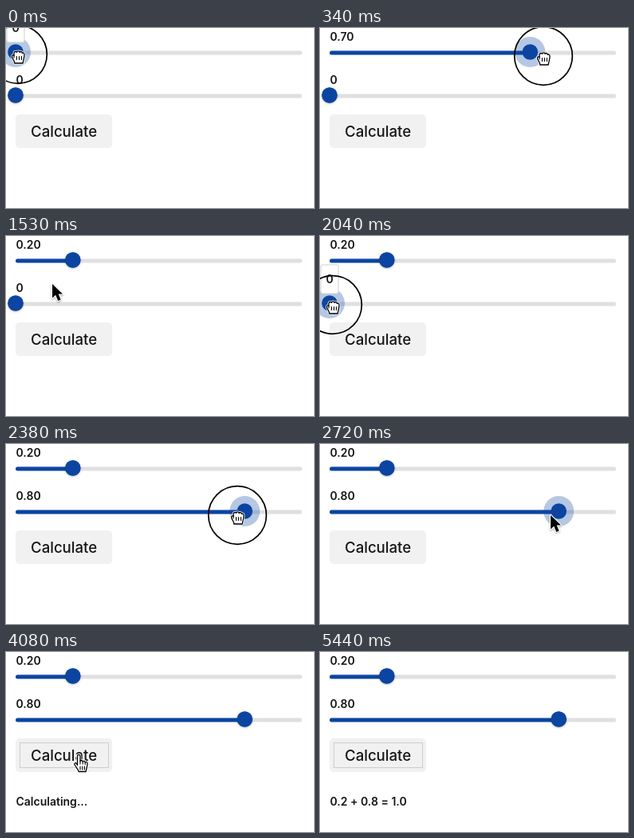
These frames come from a looping animation (386x225 px, 5.95 s). An HTML page with a canvas:

```html
<!DOCTYPE html>
<html lang="en">
<head>
<meta charset="utf-8">
<title>Two sliders</title>
<style>
html, body { margin: 0; width: 386px; height: 225px; overflow: hidden; background: #fff; }
canvas { display: block; width: 386px; height: 225px; }
</style>
</head>
<body>
<canvas id="stage"></canvas>
<script>
const W = 386, H = 225, TICK = 170, LOOP = 5950;
const canvas = document.getElementById('stage');
const g = canvas.getContext('2d');
const ratio = window.devicePixelRatio || 1;
canvas.width = W * ratio;
canvas.height = H * ratio;

const BLUE = '#0b45a1', GREY = '#e0e0e0', INK = '#151515';
const FONT = 'Inter, "Liberation Sans", sans-serif';

// [tick, value]
const first = [[0, 0], [1, 0.36], [2, 0.7], [3, 0.79], [4, 0.62], [5, 0.36], [6, 0.2]];
const second = [[12, 0], [13, 0.82], [14, 0.8]];
// [tick, x, y] of the pointer
const path = [
  [0, 15, 33], [1, 150, 34], [2, 280, 35], [3, 318, 35], [4, 252, 32], [5, 160, 29],
  [6, 103, 27], [7, 103, 27], [8, 88, 37], [9, 58, 60], [10, 24, 82], [11, 16, 86],
  [12, 16, 86], [13, 320, 88], [14, 290, 89], [16, 289, 89], [17, 262, 96],
  [18, 200, 110], [19, 130, 123], [20, 91, 129]
];

function at(keys, n, i = 1) {
  let a = keys[0];
  if (n <= a[0]) return a[i];
  for (const b of keys) {
    if (n <= b[0]) return a[i] + (b[i] - a[i]) * (n - a[0]) / ((b[0] - a[0]) || 1);
    a = b;
  }
  return a[i];
}

const within = (n, a, b) => n >= a && n <= b;

function box(x, y, w, h, r, fill) {
  g.beginPath();
  g.roundRect(x, y, w, h, r);
  g.fillStyle = fill;
  g.fill();
}

function disc(x, y, r, fill) {
  g.beginPath();
  g.arc(x, y, r, 0, Math.PI * 2);
  g.fillStyle = fill;
  g.fill();
}

function label(text, x, y, weight = 600, size = 14) {
  g.font = `${weight} ${size}px ${FONT}`;
  g.fillStyle = INK;
  g.fillText(text, x, y);
}

function slider(y, value, active, tip) {
  const x = 12 + 359 * value;
  label(value ? value.toFixed(2) : '0', 12.5, y - 15.5);
  box(12, y - 2.5, 359, 5, 2.5, GREY);
  if (value) box(12, y - 2.5, x - 12, 5, 2.5, BLUE);
  if (active) {
    disc(x, y - 1, 19, 'rgba(11,69,161,.3)');
  } else {
    g.save();
    g.shadowColor = 'rgba(0,0,0,.3)';
    g.shadowBlur = 3 * ratio;
    g.shadowOffsetY = ratio;
    disc(x, y - 1, 9.5, BLUE);
    g.restore();
  }
  disc(x, y - 1, 9.8, BLUE);
  if (tip) {
    box(x - 11, y - 49, 22, 36, 2, '#fff');
    g.strokeStyle = '#cfcfcf';
    g.lineWidth = 1;
    g.stroke();
    g.textAlign = 'center';
    label('0', x, y - 26);
    g.textAlign = 'left';
  }
}

function button(focused) {
  box(12, 108, 121, 42, 5, '#f1f1f1');
  if (focused) {
    g.strokeStyle = '#a8a8a8';
    g.lineWidth = 1;
    g.setLineDash([1, 1]);
    g.strokeRect(17.5, 113.5, 111, 31);
    g.setLineDash([]);
  }
  label('Calculate', 31, 135.5, 500, 18.6);
}

const arrow = new Path2D('M0 0V17.5L4.2 13.8L7.2 21L10.6 19.5L7.6 12.6H13Z');
const fist = new Path2D('M-4.5 9.5C-5 6.5-8 5-7.5 2C-7.2 .6-5.8 .8-5 1.4V-1.5C-5-4-1.9-4-1.6-2.6C-1.2-4.8 2-4.6 2.2-2.6C2.8-4.2 5.2-3.6 5.4-1.6C6.4-2.6 8.2-1.6 8 .4C8 4.4 6.8 6.4 6.2 11H-4.2Z');
const fistLines = new Path2D('M-1.6 2.5V6.5M1.5 2.5V6.5M4.4 2.5V6.5M-5 1V4');
const hand = new Path2D('M-1.5 12.5V1.4C-1.5-1.2 2-1.2 2 1.4V7.5C2.6 6 5 6.2 5.2 8C6 6.8 8 7.2 8.2 8.8C9.4 7.8 11 8.6 11 10.4C11 14.5 9.6 16.5 9.2 20.5H.2C-.8 17-3.6 14.8-5 11.8C-5.6 9.6-3.6 9-2.6 10.4Z');
const handLines = new Path2D('M2 7.5V11M5.2 8V11M8.2 8.8V11.4M2 14V18M4.8 14V18M7.4 14V18');

function pointer(x, y, kind) {
  g.save();
  g.translate(x, y);
  g.lineJoin = g.lineCap = 'round';
  if (kind === 'arrow') {
    g.shadowColor = 'rgba(0,0,0,.35)';
    g.shadowBlur = 2 * ratio;
    g.shadowOffsetY = ratio;
    g.lineWidth = 2.4;
    g.strokeStyle = '#fff';
    g.stroke(arrow);
    g.shadowColor = 'transparent';
    g.fillStyle = '#000';
    g.fill(arrow);
  } else {
    const grab = kind === 'grab';
    const shape = grab ? fist : hand;
    g.fillStyle = '#fff';
    g.strokeStyle = '#fff';
    g.lineWidth = 2.8;
    g.stroke(shape);
    g.fill(shape);
    g.strokeStyle = '#000';
    g.lineWidth = 1.3;
    g.stroke(shape);
    g.lineWidth = 1.1;
    g.stroke(grab ? fistLines : handLines);
  }
  g.restore();
}

function ring(x, y) {
  g.beginPath();
  g.arc(x, y, 36.3, 0, Math.PI * 2);
  g.strokeStyle = '#000';
  g.lineWidth = 1.7;
  g.stroke();
}

function draw(n) {
  g.setTransform(ratio, 0, 0, ratio, 0, 0);
  g.fillStyle = '#fff';
  g.fillRect(0, 0, W, H);

  const drag1 = n <= 7, drag2 = within(n, 11, 14), click = within(n, 20, 21);
  slider(31, at(first, n), n <= 8, n === 0);
  slider(85, at(second, n), within(n, 10, 16), within(n, 11, 12));
  button(n >= 20);
  if (n >= 28) label('0.2 + 0.8 = 1.0', 12.5, 192);
  else if (n >= 21) label('Calculating...', 12.5, 192);

  const x = at(path, n, 1), y = at(path, n, 2);
  if (drag1 || drag2 || click) ring(x, y);
  if (n < 30) pointer(x, y, drag1 || drag2 ? 'grab' : n >= 19 ? 'hand' : 'arrow');
}

const start = performance.now();
function frame() {
  const t = (performance.now() - start) % LOOP;
  draw(Math.floor(t / TICK));
  requestAnimationFrame(frame);
}
frame();
</script>
</body>
</html>
```
